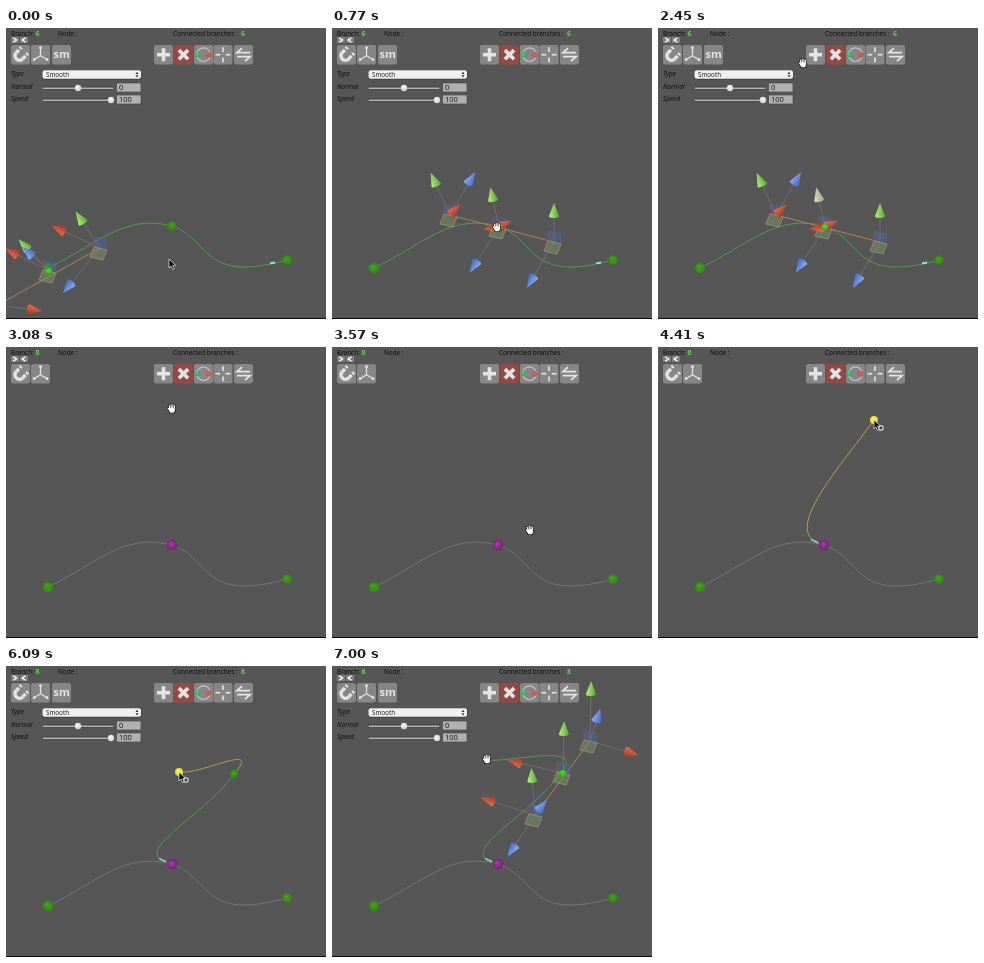
Recreate the animation shown at these times as an HTML page with a canvas. Size 320 by 291 pixels, loop 7070 ms.

```html
<!DOCTYPE html>
<html lang="en">
<head>
<meta charset="utf-8">
<title>Spline editor</title>
<style>
html, body { margin: 0; width: 100%; height: 100%; overflow: hidden; background: #565656; }
canvas { display: block; width: 320px; height: 291px; }
</style>
</head>
<body>
<canvas id="stage" width="320" height="291"></canvas>
<script>
const c = document.getElementById('stage').getContext('2d');
const LOOP = 7070, STEP = 70;
const FONT = '"Open Sans", sans-serif';
const GREEN = '#4f9c50', GREY = '#727872', YELLOW = '#aaa04c';
const LEFT = [42, 240], MID = [166, 198], RIGHT = [281, 232], TOP = [228, 108];

// Cursor stops: time, x, y
const stops = [
  [0, 163, 231], [70, 163, 231], [490, 165, 199], [770, 165, 199], [910, 166, 204],
  [1120, 166, 204], [1190, 162, 200], [1330, 162, 200], [1610, 155, 192], [2030, 156, 190],
  [2450, 145, 35], [2730, 157, 28], [2870, 157, 28], [3570, 198, 183], [3990, 168, 27],
  [4340, 215, 70], [4760, 228, 109], [5250, 228, 109], [5600, 160, 30], [5670, 160, 30],
  [6090, 173, 106], [6370, 157, 94], [6510, 155, 93], [LOOP, 155, 93]
];

// Each handle: position, then cones as colour and offset
const gizmos = {
  left: [
    [-8, 277, ['r', 36, 5]],
    [43, 243, ['g', -25, -26], ['r', -37, -19], ['b', -21, -19]],
    [94, 220, ['g', -20, -30], ['r', -41, -19], ['b', -32, 39]]
  ],
  mid: [
    [118, 187, ['g', -16, -35], ['b', 21, -36], ['r', 5, -5]],
    [167, 199, ['g', -7, -32], ['b', -25, 39], ['r', -8, 1], ['r', 6, -3]],
    [222, 214, ['g', 0, -31], ['b', -23, 39]]
  ],
  top: [
    [203, 149, ['g', -3, -39], ['r', -47, -15], ['b', 7, -9], ['b', -23, 35]],
    [231, 107, ['g', 1, -44], ['r', -48, -11]],
    [258, 75, ['g', 1, -52], ['r', 41, 12], ['b', 8, -25]]
  ]
};
const cones = {
  g: ['#b4f57a', '#56a632'], r: ['#f0694a', '#a23a28'],
  b: ['#86acfa', '#4468c0'], pale: ['#e0dfbd', '#a5a585']
};

function cursorAt(t) {
  const i = Math.max(1, stops.findIndex(s => s[0] > t));
  const [t0, x0, y0] = stops[i - 1], [t1, x1, y1] = stops[i];
  const p = (t - t0) / (t1 - t0), k = p * p * (3 - 2 * p);
  return [x0 + (x1 - x0) * k, y0 + (y1 - y0) * k];
}

function line(points, color, width = 1) {
  c.beginPath();
  points.forEach(p => c.lineTo(...p));
  c.strokeStyle = color;
  c.lineWidth = width;
  c.stroke();
}

function poly(points, fill, stroke) {
  c.beginPath();
  points.forEach(p => c.lineTo(...p));
  c.closePath();
  c.fillStyle = fill;
  c.fill();
  if (stroke) { c.strokeStyle = stroke; c.lineWidth = .7; c.stroke(); }
}

function curve(a, b, d, e, color) {
  c.beginPath();
  c.moveTo(...a);
  c.bezierCurveTo(...b, ...d, ...e);
  c.strokeStyle = color;
  c.lineWidth = 1;
  c.stroke();
}

function ring(x, y, r, color, width = 1, from = 0, to = 7) {
  c.beginPath();
  c.arc(x, y, r, from, to);
  c.strokeStyle = color;
  c.lineWidth = width;
  c.stroke();
}

function ball([x, y], r, light, dark) {
  const g = c.createRadialGradient(x - 1, y - 1.5, 0, x, y, r);
  g.addColorStop(0, light);
  g.addColorStop(1, dark);
  c.fillStyle = g;
  c.beginPath();
  c.arc(x, y, r, 0, 7);
  c.fill();
}
const greenBall = (p, r = 5.3) => ball(p, r, '#40a81a', '#32860f');

function box(x, y, w, h, fill, r = 0) {
  c.fillStyle = fill;
  c.beginPath();
  c.roundRect(x, y, w, h, r);
  c.fill();
}

function text(s, x, y, color = '#0c0c0c', style = '6.4px') {
  c.font = `${style} ${FONT}`;
  c.fillStyle = color;
  c.fillText(s, x, y);
}

// Cone centred on (x, y), pointing along the angle
function cone(x, y, angle, kind) {
  const [light, dark] = cones[kind];
  c.save();
  c.translate(x, y);
  c.rotate(angle);
  const g = c.createLinearGradient(0, -5, 0, 5);
  g.addColorStop(0, light);
  g.addColorStop(1, dark);
  c.fillStyle = g;
  c.beginPath();
  c.moveTo(8, 0);
  c.lineTo(-5, 5);
  c.ellipse(-5, 0, 2, 5, 0, Math.PI / 2, Math.PI * 1.5);
  c.fill();
  c.restore();
}

function planes(x, y, yellow) {
  const quad = (p, q) => [[x, y], [x + p[0], y + p[1]],
    [x + p[0] + q[0], y + p[1] + q[1]], [x + q[0], y + q[1]]];
  const u = [13, 3], v = [0, -10], w = [-4, 10];
  if (!yellow) {
    poly(quad(u, v), '#4b68b466', '#5364a088');
    poly(quad(v, w), '#94464433', '#8c4a4888');
  }
  poly(quad(u, w), yellow ? '#ddd58cdd' : '#7c916288', '#93a077');
}

function gizmo(name, t) {
  const parts = gizmos[name];
  const dragging = name === 'top' && t < 5600;
  line([parts[0], parts[2]].map(p => p.slice(0, 2)), '#ad8255');
  parts.forEach(([x, y, ...axes], i) => {
    const shift = dragging && i < 2 ? [-5, -11] : [0, 0];
    axes.forEach(([, dx, dy]) => line([[x, y], [x + dx, y + dy]], '#808080', .6));
    planes(x - 6 + shift[0], y - 1 + shift[1], dragging && i === 1);
    axes.forEach(([kind, dx, dy], j) => {
      const hover = name === 'mid' && i === 1 &&
        (t >= 1330 && t < 2100 ? j === 3 : t >= 2100 && j === 0);
      cone(x + dx, y + dy, Math.atan2(dy, dx), hover ? 'pale' : kind);
    });
  });
  if (!dragging) ball(parts[1], 3.2, '#4be82a', '#2fb616');
}

function icon(x, draw, fill = '#868686') {
  box(x, 17, 19, 19.5, fill, 2);
  c.save();
  c.translate(x + 9.5, 26.7);
  draw();
  c.restore();
}

const WHITE = '#e4e4e4';
function cross(width = 3.6) {
  line([[-6.5, 0], [6.5, 0]], WHITE, width);
  line([[0, -6.5], [0, 6.5]], WHITE, width);
}
function magnet() {
  c.rotate(.75);
  ring(0, 1.5, 4.5, WHITE, 3.4, 0, Math.PI);
  for (const x of [-4.5, 4.5]) {
    line([[x, 1.5], [x, -2.5]], WHITE, 3.4);
    line([[x, -4], [x, -6]], WHITE, 3.4);
  }
}
function axes() {
  for (const [x, y] of [[0, -7], [-6.5, 5], [6.5, 5]]) {
    line([[0, 1], [x, y]], WHITE, 1.3);
    ball([x, y], 1.4, WHITE, WHITE);
  }
}
function links() {
  ring(0, 0, 6.8, '#c4c4c4', 1.1);
  ball([-6, 0], 2.5, '#35e07a', '#22b45a');
  ball([5, 0], 2.8, '#d86a60', '#b8554e');
}
function split() {
  for (let i = 0; i < 4; i++) {
    line([[0, -7.5], [0, -2.8]], WHITE, 1.6);
    c.rotate(Math.PI / 2);
  }
}
function swap() {
  for (let i = 0; i < 2; i++) {
    line([[6.5, -2], [-6.5, -2], [-1.5, -6.5]], WHITE, 1.8);
    c.rotate(Math.PI);
  }
}

function toolbar(branch, panel) {
  const count = x => text(branch, x, 8, '#58d648', 'bold 7px');
  text('Branch:', 5, 8);
  count(29.5);
  text('Node :', 52, 8);
  text('Connected branches :', 167, 8);
  if (panel) count(235);
  box(5, 9, 8, 6, '#808080');
  box(14, 9, 8, 6, '#808080');
  line([[7.2, 9.7], [10.5, 12], [7.2, 14.3]], '#fff', 1.4);
  line([[19.5, 9.7], [16.2, 12], [19.5, 14.3]], '#fff', 1.4);
  icon(5, magnet);
  icon(25, axes);
  if (panel) icon(46, () => text('sm', -8, 3.2, WHITE, 'bold 11px'));
  icon(148, () => cross());
  icon(168, () => { c.rotate(Math.PI / 4); cross(); }, '#934a45');
  icon(188, links);
  icon(207.5, split);
  icon(228, swap);
}

function slider(label, y, knob, value) {
  text(label, 5, y + 1.2, '#0c0c0c', 'italic 6.4px');
  box(36, y - 1.5, 72, 3, '#404040', 1.5);
  box(36.5, y - .5, 71, 1.6, '#b4b4b4', .8);
  ball([knob, y], 3.2, '#fff', '#d0d0d0');
  box(110.5, y - 5, 24.5, 9, '#b0b0b0');
  c.strokeStyle = '#484848';
  c.lineWidth = .7;
  c.strokeRect(110.5, y - 5, 24.5, 9);
  text(value, 113, y + 2.3, '#111', '7.5px');
}

function settings() {
  text('Type', 5, 48, '#0c0c0c', 'italic 6.4px');
  box(36, 42, 99.5, 9.5, '#383838', 2);
  box(36.5, 42.2, 98.5, 8.6, '#f0f0f0', 2);
  text('Smooth', 40, 48.8, '#111', '6.3px');
  poly([[129.5, 46], [132.5, 46], [131, 43.8]], '#333');
  poly([[129.5, 47.2], [132.5, 47.2], [131, 49.4]], '#333');
  slider('Normal', 60, 72, '0');
  slider('Speed', 72, 105, '100');
}

function arrow([x, y], plus) {
  const shape = [[0, 0], [0, 9], [2, 7], [3.6, 10.5], [5.2, 9.8], [3.7, 6.4], [6.5, 6.2]];
  poly(shape.map(([a, b]) => [x + a, y + b]), '#080808', '#eee');
  if (plus) {
    ball([x + 7, y + 8], 2.8, '#eee', '#ccc');
    line([[x + 5.3, y + 8], [x + 8.7, y + 8]], '#111');
    line([[x + 7, y + 6.3], [x + 7, y + 9.7]], '#111');
  }
}

function hand([x, y]) {
  const fingers = [[-3, -3], [-1, -4.5], [1.2, -4.3], [3.2, -3]];
  c.save();
  c.translate(x, y);
  c.scale(.85, .85);
  for (const [color, grow] of [['#111', .7], ['#f6f6f6', 0]]) {
    c.lineCap = 'round';
    fingers.forEach(([a, b]) => line([[a, b], [a * .8, 1]], color, 1.4 + grow * 2));
    line([[-4.2, 0], [-2, 2.5]], color, 1.6 + grow * 2);
    c.lineCap = 'butt';
    box(-3 - grow, -1 - grow, 6.4 + grow * 2, 6 + grow * 2, color, 2);
  }
  c.restore();
}

function scene(t) {
  const second = t >= 2870, panel = !second || t >= 4900;
  const cursor = cursorAt(t);
  const firstPreview = t >= 4410 && t < 4900;
  const nextPreview = t >= 5670 && t < 6440;
  const main = second ? GREY : GREEN;

  box(0, 0, 320, 291, '#565656');
  box(0, 290, 320, 1, '#080808');
  toolbar(second ? '8' : '6', panel);
  if (panel) settings();

  curve(LEFT, [95, 214], [118, 186], MID, main);
  curve(MID, [206, 212], [195, 256], RIGHT, main);
  if (!second) line([[264, 235.3], [269, 234.5]], '#8fe4e8', 1.8);
  if (t >= 4410) {
    const end = firstPreview ? cursor : TOP;
    curve(MID, [118, 188], [end[0] - 31, end[1] + 44], end, firstPreview ? YELLOW : GREEN);
    line([[153, 192.5], [160, 195.5]], '#7edcc6', 1.4);
  }
  if (t >= 5670) {
    const end = nextPreview ? cursor : [155, 94];
    curve(TOP, [257, 75], [end[0] + 23, end[1] + 3], end, nextPreview ? YELLOW : GREEN);
  }

  greenBall(LEFT);
  greenBall(RIGHT, 4.8);
  if (second) ball(MID, 5.2, '#ac3cac', '#762078');
  else if (t < 560) greenBall(MID, 4.6);
  if (t >= 5670) greenBall(TOP, 4.3);
  if (firstPreview || nextPreview) ball(cursor, 4, '#fff84a', '#e6d820');

  if (t < 560) gizmo('left', t);
  else if (!second) gizmo('mid', t);
  else if (t >= 4900 && t < 5670 || t >= 6650) gizmo('top', t);
  if (t >= 4900 && t < 5320) {
    ring(228, 109, 19.3, '#b4b4b4', .8);
    ring(228, 109, 17, '#8c8c8c', .7);
  }

  if (firstPreview || nextPreview) arrow(cursor, true);
  else if (t < 770) arrow(cursor);
  else hand(cursor);
}

const start = performance.now();
function tick() {
  const t = (performance.now() - start) % LOOP;
  scene(Math.floor(t / STEP) * STEP);
  requestAnimationFrame(tick);
}
tick();
</script>
</body>
</html>
```
